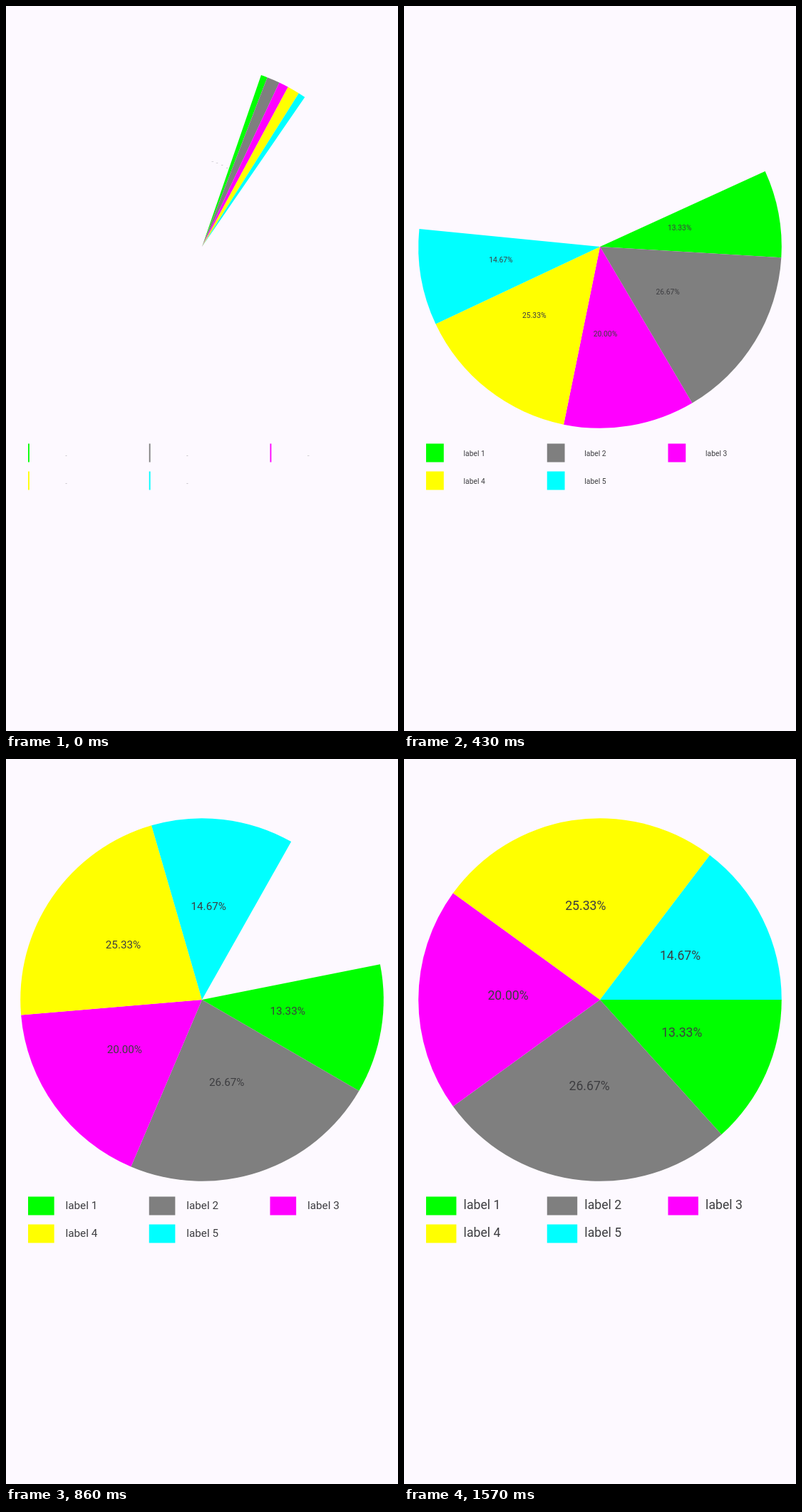
Recreate the animation shown at these times as an HTML page with a canvas. Size 550 by 1018 pixels, loop 1.71 s.

```html
<!DOCTYPE html>
<html lang="en">
<head>
<meta charset="utf-8">
<title>Pie chart</title>
<style>
  html, body { margin: 0; width: 100%; height: 100%; overflow: hidden; background: #fdf9ff; }
  canvas { display: block; }
</style>
</head>
<body>
<canvas id="stage" width="550" height="1018"></canvas>
<script>
const ctx = document.getElementById('stage').getContext('2d');
const LOOP = 1710, STEPS = 12;
const CX = 275, CY = 338, R = 254.8;
const FONT = 17.65, CELL = 169.75;

const slices = [
  { value: 10, color: '#00ff00' },
  { value: 20, color: '#7f7f7f' },
  { value: 15, color: '#ff00ff' },
  { value: 19, color: '#ffff00' },
  { value: 11, color: '#00ffff' },
];
const total = slices.reduce((sum, s) => sum + s.value, 0);

// [step, growth 0..1, start angle in degrees]
const keys = [
  [0, 0.043, -71], [1, 0.202, -58.3], [2, 0.397, -35.4], [3, 0.584, -24.6],
  [5, 0.795, -14.5], [7, 0.913, -8.7], [9, 0.98, -4], [11, 1, 0],
];

function slope(i, c) {
  const a = keys[Math.max(i - 1, 0)];
  const b = keys[Math.min(i + 1, keys.length - 1)];
  return (b[c] - a[c]) / (b[0] - a[0]);
}

// Cubic Hermite through the keys
function curve(x, c) {
  let i = 0;
  while (i < keys.length - 2 && x >= keys[i + 1][0]) i++;
  const a = keys[i], b = keys[i + 1], w = b[0] - a[0];
  const u = (x - a[0]) / w, v = 1 - u;
  return v * v * (1 + 2 * u) * a[c] + u * u * (3 - 2 * u) * b[c]
    + u * v * w * (v * slope(i, c) - u * slope(i + 1, c));
}

// The picture advances seven times a second, on 10 ms ticks
function stepAt(ms) {
  let n = 0;
  while (n < STEPS - 1 && ms >= Math.round((n + 1) * 100 / 7) * 10) n++;
  return n;
}

function text(str, x, y) {
  ctx.fillStyle = '#3d3d40';
  ctx.fillText(str, x, y);
}

function drawPie(grow, start) {
  const labels = [];
  let from = start;
  for (const s of slices) {
    const sweep = s.value / total * 2 * Math.PI * grow;
    const mid = from + sweep / 2;
    ctx.fillStyle = s.color;
    ctx.beginPath();
    ctx.moveTo(CX, CY);
    ctx.arc(CX, CY, R, from, from + sweep);
    ctx.fill();
    labels.push([
      (s.value / total * 100).toFixed(2) + '%',
      CX + R / 2 * Math.cos(mid) - 30.2,
      CY + R / 2 * Math.sin(mid) + 0.2,
    ]);
    from += sweep;
  }
  labels.forEach(l => text(...l));
}

function drawLegend(grow) {
  slices.forEach((s, i) => {
    const x = 31 + (i % 3) * CELL;
    const y = 614.5 + Math.floor(i / 3) * 39;
    ctx.fillStyle = s.color;
    ctx.fillRect(x, y, CELL / 4 * grow, 26);
    text('label ' + (i + 1), x + 52.6, y + 17.7);
  });
}

function draw(ms) {
  const n = stepAt(ms % LOOP);
  const grow = curve(n, 1);
  ctx.fillStyle = '#fdf9ff';
  ctx.fillRect(0, 0, 550, 1018);
  ctx.font = `${FONT * grow}px Roboto, sans-serif`;
  drawPie(grow, curve(n, 2) * Math.PI / 180);
  drawLegend(grow);
}

let begin;
function tick(now) {
  begin ??= now;
  draw(now - begin);
  requestAnimationFrame(tick);
}
draw(0);
requestAnimationFrame(tick);
</script>
</body>
</html>
```
